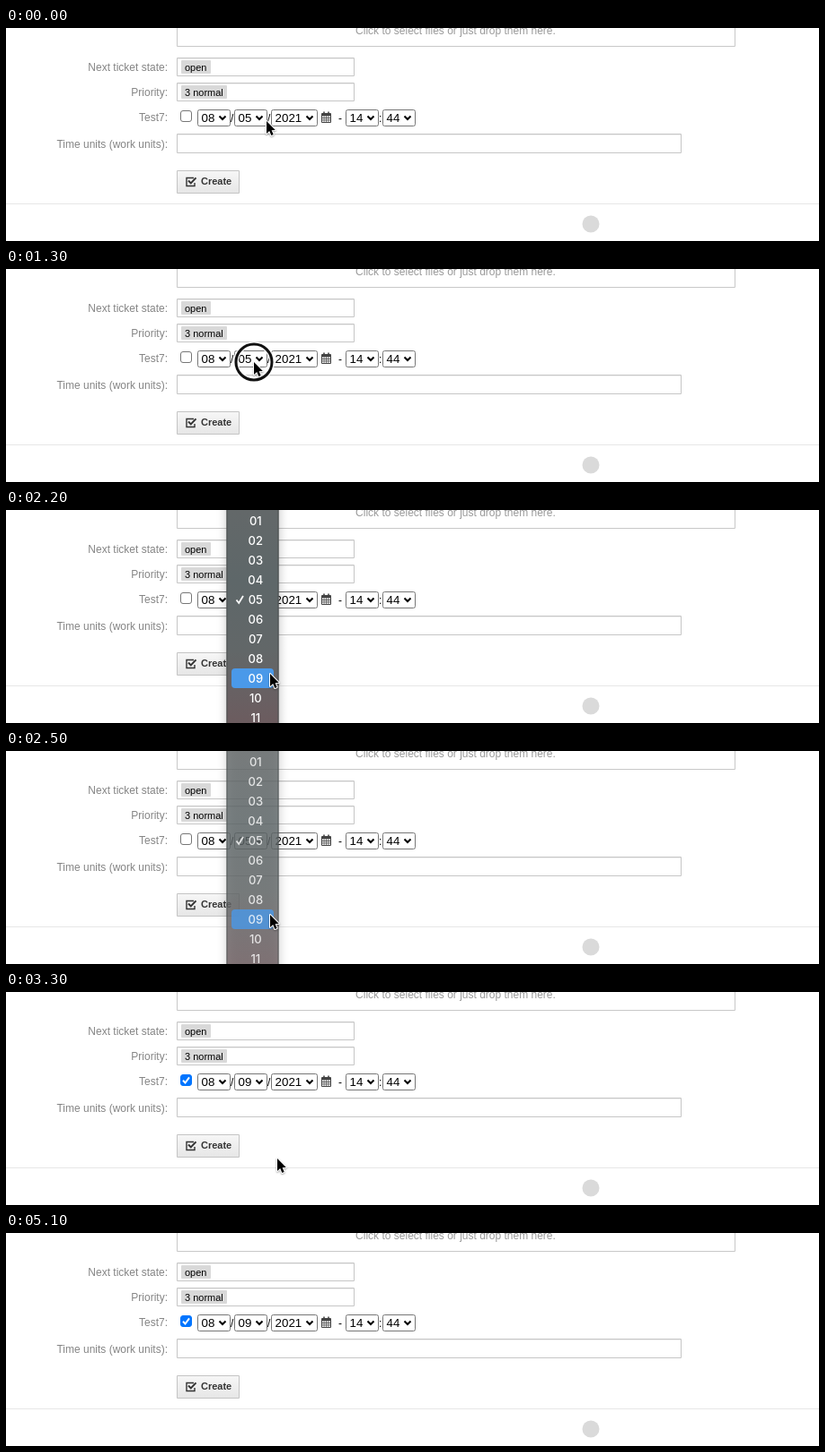
An HTML page with a canvas that plays this animation: 905x238 px, repeating every 5.3 s.

```html
<!DOCTYPE html>
<html lang="en">
<head>
<meta charset="utf-8">
<title>Ticket form</title>
<style>
  html, body { margin: 0; width: 100%; height: 100%; overflow: hidden; background: #fff; }
  canvas { display: block; }
</style>
</head>
<body>
<canvas id="stage" width="905" height="238"></canvas>
<script>
const ctx = document.getElementById('stage').getContext('2d');
const LOOP = 5300, STEP = 100;
const SANS = '"Liberation Sans", Arial, sans-serif';
const MENU = { x: 245.5, w: 58, rowHeight: 22, firstY: 12 };

// time, x, y of the pointer tip
const POINTER = [
  [0, 290, 104], [200, 289, 104], [400, 285, 101], [500, 280, 99],
  [700, 278, 100], [900, 276, 100], [1300, 276, 104],
  [1800, 279, 122], [1900, 287, 155], [2000, 294, 183],
  [3300, 302, 186], [3400, 314, 186], [3500, 304, 182], [4500, 349, 199]
];
const POINTER_GONE = 4600;
const MENU_OPEN = 1400, MENU_CLOSED = 2700, VALUE_SET = 2800;
const RING_FADE = [[1100, 0.5], [1200, 1], [1400, 0]];
const MENU_FADE = [[1400, 1], [2300, 0.96], [2400, 0.9], [2500, 0.8], [2600, 0.4], [2700, 0]];

const latest = (keys, t) => keys.filter(k => k[0] <= t).pop();

function text(str, x, y, font, color, align = 'left') {
  ctx.font = font;
  ctx.fillStyle = color;
  ctx.textAlign = align;
  ctx.fillText(str, x, y);
}

function box(x, y, w, h, radius, fill, stroke) {
  ctx.beginPath();
  ctx.roundRect(x, y, w, h, radius);
  if (fill) { ctx.fillStyle = fill; ctx.fill(); }
  if (stroke) { ctx.strokeStyle = stroke; ctx.lineWidth = 1; ctx.stroke(); }
}

function line(points, color, width) {
  ctx.beginPath();
  points.forEach(([x, y]) => ctx.lineTo(x, y));
  ctx.strokeStyle = color;
  ctx.lineWidth = width;
  ctx.stroke();
}

function gradient(y0, y1, ...colors) {
  const g = ctx.createLinearGradient(0, y0, 0, y1);
  colors.forEach((c, i) => g.addColorStop(i / (colors.length - 1), c));
  return g;
}

function field(x, y, w, h) {
  box(x + 0.5, y + 0.5, w, h, 0, '#fff', '#c6c6c6');
  line([[x + 1, y + 1.5], [x + w, y + 1.5]], '#eee', 1);
}

function tag(str, y, w) {
  box(195, y, w, 15, 1, '#d9d9d9');
  text(str, 199, y + 11.5, '11px ' + SANS, '#000');
}

function select(value, x, w) {
  box(x + 0.5, 91.5, w, 18, 2, '#fff', '#767676');
  text(value, x + 4.6, 105, '13.33px ' + SANS, '#000');
  const cx = x + w - 8;
  line([[cx - 3.5, 98.5], [cx, 102], [cx + 3.5, 98.5]], '#000', 2);
}

function checkbox(checked) {
  box(194.5, 92.5, 12, 12, 2.5, checked ? '#0075ff' : '#fff', checked ? '#0075ff' : '#767676');
  if (checked) line([[197, 98.8], [199.5, 101.5], [204, 95.3]], '#fff', 2);
}

function calendar() {
  box(351, 95, 11, 11, 1, '#444');
  ctx.fillStyle = '#fff';
  for (let row = 0; row < 3; row++)
    for (let col = 0; col < 4; col++)
      ctx.fillRect(352 + col * 2.4, 98.3 + row * 2.5, 1.7, 1.7);
  line([[354, 93.5], [354, 97]], '#444', 1.6);
  line([[359, 93.5], [359, 97]], '#444', 1.6);
}

function createButton() {
  box(190.5, 159.5, 69, 25, 0, gradient(159, 185, '#f7f7f7', '#e6e6e6'), '#c4c4c4');
  line([[209, 167.5], [201, 167.5], [201, 176.5], [210, 176.5], [210, 173]], '#333', 1.4);
  line([[203, 170.5], [205.8, 173.4], [211.5, 167.4]], '#333', 2);
  text('Create', 217, 175, 'bold 11px ' + SANS, '#333');
}

function form(t) {
  const done = t >= VALUE_SET;
  ctx.fillStyle = '#fff';
  ctx.fillRect(0, 0, 905, 238);
  box(190.5, -20.5, 621, 41, 0, '#fff', '#c8c8c8');
  text('Click to select files or just drop them here.', 500.5, 7, '12px ' + SANS, '#999', 'center');
  [['Next ticket state:', 48], ['Priority:', 76], ['Test7:', 104], ['Time units (work units):', 134]]
    .forEach(([label, y]) => text(label, 180, y, '12px ' + SANS, '#858585', 'right'));
  field(190, 33, 197, 20);
  tag('open', 36, 33);
  field(190, 61, 197, 20);
  tag('3 normal', 64, 51);
  field(190, 118, 561, 21);

  checkbox(done);
  select('08', 213, 36);
  select(done ? '09' : '05', 254, 36);
  select('2021', 295, 51);
  select('14', 378, 36);
  select('44', 419, 36);
  [['/', 250], ['/', 291], ['-', 370], [':', 415]]
    .forEach(([mark, x]) => text(mark, x, 104.5, '12px ' + SANS, '#000'));
  calendar();
  createButton();

  ctx.fillStyle = '#e6e6e6';
  ctx.fillRect(0, 196, 905, 1);
  box(641.5, 209.5, 19, 19, 9.5, '#dadada');
}

function menu(alpha, active) {
  const { x, w, rowHeight, firstY } = MENU;
  ctx.save();
  ctx.globalAlpha = alpha;
  ctx.save();
  ctx.shadowColor = 'rgba(0,0,0,.28)';
  ctx.shadowBlur = 11;
  box(x, -20, w, 280, 0, gradient(0, 238, '#636869', '#5e6769', '#626768', '#6c5c5f'));
  ctx.restore();
  line([[x + 0.5, 0], [x + 0.5, 238]], '#4a4e4f', 1);
  line([[x + w - 0.5, 0], [x + w - 0.5, 238]], '#4a4e4f', 1);
  box(251, firstY + (active - 1) * rowHeight - 11, 47, rowHeight, 4, '#4a99e9');
  for (let n = 1; n <= 11; n++) {
    const y = firstY + (n - 1) * rowHeight;
    text(String(n).padStart(2, '0'), 277.8, y + 5, '500 13px Inter, sans-serif', '#fff', 'center');
  }
  line([[256.5, 100.5], [259.2, 104], [264, 96]], '#fff', 1.8);
  ctx.restore();
}

function ring(x, y, alpha) {
  ctx.save();
  ctx.globalAlpha = alpha;
  for (const [color, width] of [['rgba(255,255,255,.8)', 6], ['#111', 3]]) {
    ctx.beginPath();
    ctx.arc(x, y, 20, 0, Math.PI * 2);
    ctx.strokeStyle = color;
    ctx.lineWidth = width;
    ctx.stroke();
  }
  ctx.restore();
}

function pointer(x, y) {
  ctx.save();
  ctx.translate(x, y);
  ctx.beginPath();
  [[0, 0], [0, 14], [3.2, 11], [5.3, 16], [7.7, 15], [5.6, 10.2], [9.8, 10]]
    .forEach(([px, py]) => ctx.lineTo(px, py));
  ctx.closePath();
  ctx.lineJoin = 'round';
  ctx.shadowColor = 'rgba(0,0,0,.35)';
  ctx.shadowBlur = 2;
  ctx.shadowOffsetY = 1;
  ctx.strokeStyle = '#fff';
  ctx.lineWidth = 2;
  ctx.stroke();
  ctx.shadowColor = 'transparent';
  ctx.fillStyle = '#000';
  ctx.fill();
  ctx.restore();
}

function draw(now) {
  const t = Math.floor((now % LOOP) / STEP) * STEP;
  const [, x, y] = latest(POINTER, t);
  form(t);
  const ringKey = latest(RING_FADE, t);
  if (ringKey && ringKey[1]) ring(x, y, ringKey[1]);
  if (t >= MENU_OPEN && t < MENU_CLOSED)
    menu(latest(MENU_FADE, t)[1], Math.round((y - MENU.firstY) / MENU.rowHeight) + 1);
  if (t < POINTER_GONE) pointer(x, y);
}

const start = performance.now();
function tick() {
  draw(performance.now() - start);
  requestAnimationFrame(tick);
}
tick();
</script>
</body>
</html>
```
